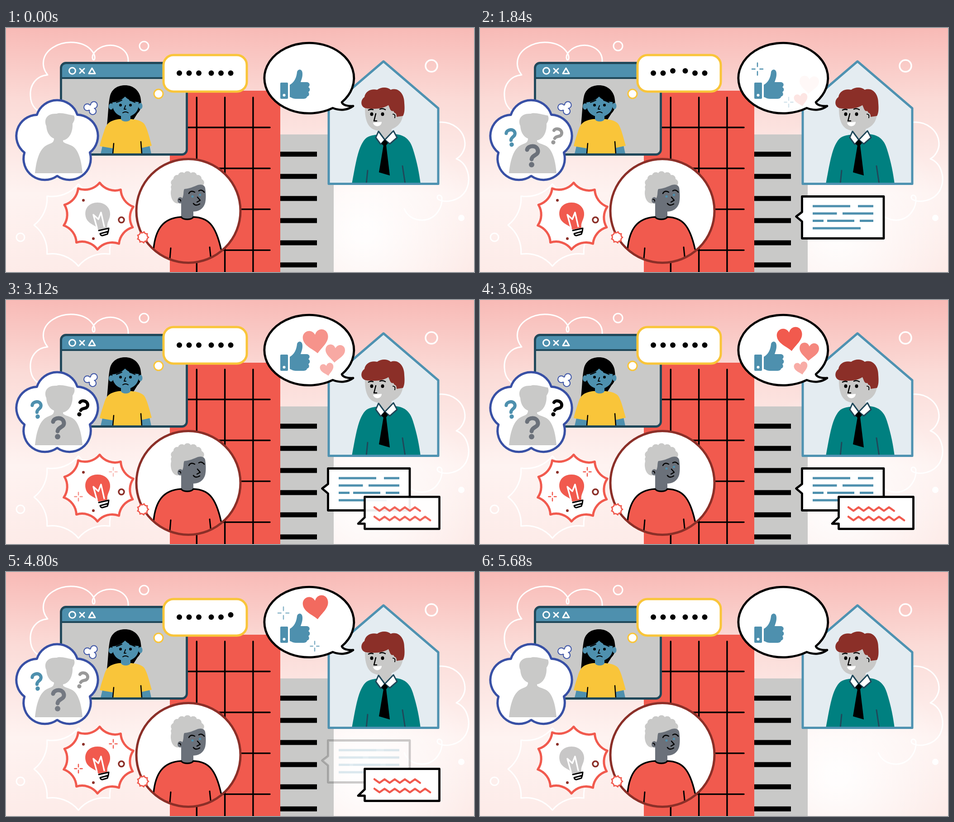
An HTML page with a canvas that plays this animation: 1034 by 541 pixels, repeating every 5.76 s.

```html
<!DOCTYPE html>
<html lang="en">
<head>
<meta charset="utf-8">
<title>Conversations</title>
<style>
html, body { margin: 0; width: 100%; height: 100%; overflow: hidden; }
canvas { display: block; width: 100vw; height: 100vh; }
</style>
</head>
<body>
<canvas id="stage" width="1034" height="541"></canvas>
<script>
const W = 1034, H = 541, LOOP = 5760, STEP = 80;
const RED = '#f15a4e', BLUE = '#4e90ae', GREY = '#c9c9c8', DARK = '#20485a',
  MAROON = '#8b2f28', YELLOW = '#f9c53a', INDIGO = '#3850a5', SLATE = '#6b717a',
  TEAL = '#008080', BLACK = '#000', WHITE = '#fff';

const stage = document.getElementById('stage').getContext('2d');
const backdrop = document.createElement('canvas');
backdrop.width = W;
backdrop.height = H;
let c = backdrop.getContext('2d');

function paint(shape, fill, line, width = 3) {
  const p = typeof shape === 'string' ? new Path2D(shape) : shape;
  if (fill) { c.fillStyle = fill; c.fill(p); }
  if (line) {
    c.strokeStyle = line;
    c.lineWidth = width;
    c.lineCap = c.lineJoin = 'round';
    c.stroke(p);
  }
}
function oval(x, y, rx, ry = rx) {
  const p = new Path2D();
  p.ellipse(x, y, rx, ry, 0, 0, 7);
  return p;
}
function box(x, y, w, h, r = 0) {
  const p = new Path2D();
  p.roundRect(x, y, w, h, r);
  return p;
}
function inside(shape, draw) {
  c.save();
  c.clip(shape);
  draw();
  c.restore();
}
function faded(alpha, draw) {
  if (alpha <= 0) return;
  c.save();
  c.globalAlpha = Math.min(1, alpha);
  draw();
  c.restore();
}
function repeat(n, draw) {
  for (let i = 0; i < n; i++) draw(i);
}

// n points on an ellipse, clockwise from the top
const ring = (n, x, y, rx, ry, turn = 0) => Array.from({ length: n }, (_, i) => {
  const a = turn + i / n * Math.PI * 2;
  return [x + rx * Math.sin(a), y - ry * Math.cos(a)];
});
// Closed outline of arcs between points: bulge 1 bows outwards, 0 inwards
const arcs = (points, r, bulge) =>
  `M${points[points.length - 1]}` + points.map(p => `A${r},${r} 0 0 ${bulge} ${p}`).join('') + 'Z';

function drawSky() {
  const g = c.createLinearGradient(0, 0, 0, H);
  g.addColorStop(0, '#f8bab6');
  g.addColorStop(.3, '#fbdbd7');
  g.addColorStop(.68, '#fef3f1');
  g.addColorStop(1, '#fdebe8');
  c.fillStyle = g;
  c.fillRect(0, 0, W, H);
  const glow = c.createRadialGradient(790, 450, 20, 790, 450, 250);
  glow.addColorStop(0, 'rgba(255,255,255,.9)');
  glow.addColorStop(1, 'rgba(255,255,255,0)');
  c.fillStyle = glow;
  c.fillRect(0, 0, W, H);
  paint('M270,76C272,48 245,35 222,39C200,43 187,60 192,70C197,73 199,62 190,51C172,28 130,26 104,43C80,58 76,84 92,104C68,106 52,125 54,151C55,174 68,186 90,193', null, WHITE);
  paint('M957,209C985,207 1012,225 1014,255C1015,270 1005,285 995,290C1020,300 1030,335 1015,362C1000,385 970,388 955,380C948,372 960,366 963,376C965,397 950,425 920,426C900,426 886,416 880,401', null, WHITE);
  paint(arcs(ring(8, 160, 437, 98, 91), 75, 0), null, WHITE);
  paint(oval(305, 40, 10), null, WHITE);
  paint(oval(940, 84, 13), null, WHITE, 3.5);
  paint(oval(32, 464, 9), null, WHITE);
  paint(oval(1006, 421, 7), WHITE);
}

function drawBuildings() {
  paint(box(605, 236, 119, 305), GREY);
  repeat(6, i => paint(box(605, 274.3 + i * 49.1, 82, 11), BLACK));
  paint(box(362, 139, 244, 402), RED);
  repeat(3, i => paint(`M${421.3 + i * 62.3},154V545`, null, BLACK, 3.4));
  repeat(4, i => paint(`M395,${220.5 + i * 90.7}H583`, null, BLACK, 3.4));
}

function drawWindow() {
  const frame = box(121.5, 77.5, 278, 203, 11);
  paint(frame, GREY);
  inside(frame, () => {
    paint(box(120, 76, 282, 35), BLUE);
    paint('M120,111H402', null, DARK, 4);
    drawWoman();
  });
  paint(frame, null, DARK, 4.8);
  paint(oval(146.5, 95, 7), null, WHITE);
  paint('M163,90L173,100M173,90L163,100', null, WHITE);
  paint('M190,89L197,101H183Z', null, WHITE);
}

function drawWoman() {
  paint('M223,216C226,190 226,166 230,150C235,133 249,127 263,127C280,127 293,137 297,153C300,170 300,180 290,190L280,206Z', BLACK);
  paint('M213,262L237,256V279H209ZM298,254L317,260L321,279H298Z', BLUE);
  paint('M250,202C230,205 222,211 217,228C212,243 209,253 207,262L237,267L236,279H300L299,266L322,261C316,240 312,222 305,212C298,205 288,203 277,202Z', YELLOW);
  paint('M238,256L236,279M298,252L300,279', null, BLACK, 2.5);
  paint(oval(232, 174, 5, 7), BLUE);
  paint(oval(297, 173, 4.5, 7), BLUE);
  paint('M254,188H275V202C273,209 256,209 254,202Z', BLUE);
  paint('M235,165C245,164 256,160 263,152C270,160 282,164 293,164C296,184 281,197 265,197C248,197 234,186 235,165Z', BLUE);
  paint('M244,165Q250,163 256,160M273,160Q279,162 285,165', null, BLACK, 2);
  paint('M264,172L261,180H265M258,188Q264,184 270,188', null, BLACK, 2);
}

function drawTyping() {
  paint(box(348, 60, 184, 81, 22), WHITE, YELLOW, 5);
  paint(oval(337, 146, 10), WHITE, YELLOW);
}

function drawThought() {
  paint(arcs(ring(5, 113, 253, 76, 75, -.63), 47, 1), WHITE, INDIGO, 5);
  paint('M64,322C67,292 74,270 88,261C98,255 106,256 106,245C96,241 90,231 89,217C83,203 90,189 112,190C120,186 137,192 150,194C154,202 149,209 147,212C148,232 139,247 126,249C125,256 137,256 147,262C160,270 167,294 169,322Z', GREY);
  const puffs = ring(3, 188.5, 177, 9, 8, -1.4);
  for (const p of puffs) paint(oval(...p, 6.5), null, INDIGO, 4);
  for (const p of puffs) paint(oval(...p, 6.5), WHITE);
  paint(oval(188.5, 177, 6), WHITE);
}

function drawIdea() {
  paint(arcs(ring(10, 204.5, 417, 80, 74, .03), 42, 0), WHITE, RED, 5);
  paint(oval(171, 382, 3), MAROON);
  paint(oval(193, 467, 3), MAROON);
  paint(oval(255, 425.5, 6), null, MAROON, 3.5);
}

function drawElder() {
  const disc = oval(403, 405.5, 115);
  paint(disc, WHITE);
  inside(disc, () => {
    paint('M326,492C330,450 345,421 388,419L414,419C448,420 464,438 477,492L477,530H326Z', RED);
    paint('M387,385H414V418C411,426 390,426 387,418Z', SLATE);
    paint('M326,490C330,448 346,421 387,419C391,426 410,426 414,419C446,420 463,436 475,490', null, BLACK, 3.5);
    paint('M364,488L361,524M450,486L453,515', null, BLACK, 3);
    for (const p of ring(14, 401, 348, 29, 22)) paint(oval(...p, 8.5), GREY);
    paint(oval(401, 348, 30, 24), GREY);
    paint(oval(379, 366, 15, 23), GREY);
    paint('M388,380C394,372 391,362 394,357C406,356 414,352 424,348C432,346 438,348 440,354C442,368 442,378 440,388C436,402 424,408 410,407C397,406 389,396 388,380Z', SLATE);
    paint(oval(385, 382, 6, 7), SLATE);
    paint('M382,380Q386,379 386,384', null, BLACK, 2);
    paint('M404,367Q408,359 417,364M426,361Q432,357 438,364', null, BLACK, 2.5);
    paint('M423,375L429,382L422,386M414,389Q419,396 428,390', null, BLACK, 2.5);
  });
  paint(disc, null, MAROON, 5);
  paint(arcs(ring(9, 302.5, 464, 12.5, 12.5, .2), 6, 0), WHITE, RED, 2.8);
}

function drawHouse() {
  const house = new Path2D('M713,345.5V178L834,74L955,178V345.5Z');
  paint(house, '#e4ecf1');
  inside(house, () => {
    paint('M764,346C773,300 778,258 797,243C806,237 820,237 828,235H850C878,234 892,245 899,268C908,296 913,322 916,346Z', TEAL);
    paint('M799,316L796,346M876,306L882,346', null, DARK);
    paint('M823,215H852V236L837,249L823,235Z', GREY);
    paint('M834,260H840L848,327L824,320Z', BLACK);
    paint('M823,229L817,243L828,258L837,248ZM856,228L864,243L848,257L837,248Z', WHITE, DARK);
    paint('M837,247L844,255L837,264L829,256Z', BLACK);
    paint('M793,172C792,210 802,228 828,228C858,228 876,214 877,190L850,165H800Z', GREY);
    paint('M796,178C783,176 782,160 792,153C794,139 808,134 820,137C830,130 843,131 850,137C866,131 880,145 880,166C881,178 881,188 877,195L863,197L856,184C849,186 848,177 845,171C832,180 810,180 796,178Z', MAROON);
    paint(oval(858, 195, 5, 7), GREY);
    paint('M855,191Q861,191 859,199', null, BLACK, 2);
    paint('M801,182Q806,179 811,181M826,180Q832,177 838,181', null, BLACK, 2.5);
    paint('M817,190L813,206H819', null, BLACK, 2.5);
    paint('M811,210L830,208C830,220 813,221 811,210Z', WHITE);
  });
  paint(house, null, '#4e92b1', 5);
}

function drawLikeBubble() {
  paint('M742,164.5A99,78 0 1 0 722,177.4C738,184 755,182 767,173C755,174 744,171 742,164.5Z', WHITE, BLACK, 4.8);
  paint(box(606, 121, 17, 36, 2), BLUE);
  paint(oval(614.5, 149, 3), WHITE);
  paint('M627,126C638,120 642,108 643,98C644,90 656,89 655,103C655,110 652,116 651,120H664C671,120 673,127 668,131C673,134 672,140 668,142C671,146 670,151 665,152C665,156 660,157 656,157H640C634,157 631,154 627,153Z', BLUE);
}

const clamp = v => Math.max(0, Math.min(1, v));
const smooth = v => v * v * (3 - 2 * v);
// Opacity that rises after one time and falls after another
const show = (t, from, to, rise = 400, fall = 400) =>
  clamp(Math.min((t - from) / rise, (to + fall - t) / fall));

function placed(alpha, x, y, size, turn, draw) {
  faded(alpha, () => {
    c.translate(x, y);
    c.rotate(turn);
    c.scale(size, size);
    draw();
  });
}
function question(t, order, x, y, size, turn, color) {
  placed(show(t, 480 + order * 600, 4960 - order * 200), x, y, size, turn, () => {
    paint('M-10,-33C-8,-43 12,-45 14,-31C15,-20 1,-22 0,-12', null, color, 9);
    paint(oval(0, 0, 6), color);
  });
}
// Smaller hearts come and go earlier, and climb less
function heart(t, order, x, y, turn) {
  const size = 56 - 13 * order;
  const climb = smooth(clamp((t - 1200) / 4320));
  const alpha = show(t, 2240 - order * 520, 4760 - order * 640, 1350 * (order + 1));
  placed(alpha, x, y - size * .47 * climb, size, turn, () =>
    paint('M0,.47C-.2,.25 -.5,.1 -.5,-.18C-.5,-.48 -.12,-.56 0,-.27C.12,-.56 .5,-.48 .5,-.18C.5,.1 .2,.25 0,.47Z', RED));
}
function sparkle(alpha, x, y, r, color) {
  placed(alpha, x, y, 1, 0, () => {
    const k = r * .45, v = r * 1.12;
    paint(`M${-r},0H${-k}M${k},0H${r}M0,${-v}V${-k}M0,${k}V${v}`, null, color, 2.5);
  });
}
function zigzag(x, y, count) {
  let d = `M${x},${y}`;
  repeat(count, i => d += `l11.2,${i % 2 ? -8 : 8}`);
  paint(d, null, RED, 4.5);
}

function drawBulb(t) {
  const bulb = 'M176,418C172,398 186,387 202,387C220,387 231,400 230,414C229,426 222,431 224,443L204,447C200,436 180,436 176,418Z';
  paint(bulb, '#c8c7c7');
  faded(show(t, 1440, 5040), () => paint(bulb, RED));
  paint('M201,443L193,414L204,424L210,409L217,440', null, WHITE, 3.4);
  paint('M205,449L227,444L226,451L208,456Q209,461 214,460L224,457L226,451', WHITE, BLACK, 3);
}

function drawEyes(t) {
  const open = from => t < from || t >= from + 160;
  if (open(4240)) for (const x of [253, 275]) paint(oval(x, 171, 3), BLACK);
  else paint('M249,171Q253,174 257,171M271,171Q275,174 279,171', null, BLACK, 2);

  if (open(3040)) for (const x of [412, 428.5]) paint(oval(x, 460 - x * .21, 2.6), BLUE);

  if (open(720)) for (const x of [808, 832]) paint(oval(x, 191, 3.5, 4), BLACK);
  else paint('M803,191Q808,194 812,191M827,191Q832,194 836,191', null, BLACK, 2.5);
}

function drawDots(t) {
  repeat(6, i => {
    const wave = mid => smooth(clamp(1 - Math.abs(t - mid - (i - 2.5) * 160) / 240));
    const x = 383 + i * 21.5 + (i > 2 ? 6 : 0);
    paint(oval(x, 100 - 6.7 * (wave(1840) + wave(4320)), 6), BLACK);
  });
}

function drawReactions(t) {
  sparkle(show(t, 800, 1840, 800, 600) + show(t, 4480, 5120, 480, 560), 613, 91, 12, BLUE);
  sparkle(show(t, 560, 1120, 400, 960) + show(t, 3800, 5200, 1400, 480), 682, 164.5, 9.5, BLUE);
  heart(t, 0, 685, 103, -.14);
  heart(t, 1, 727, 127, .07);
  heart(t, 2, 709.5, 160, -.2);
}

function drawMessages(t) {
  faded(show(t, 1440, 4480), () => {
    paint('M711.5,408V373.5H892V466.5H711.5V429L698.5,418Z', WHITE, BLACK, 4.8);
    repeat(4, i => {
      const y = 392.5 + i * 16.3;
      paint(box(735, y, i < 3 ? 134 : 106, 5), BLUE);
      if (i < 3) paint(box(818 - i * 29.5, y - 1, 17 - i * 4.5, 7), WHITE);
      if (i === 2) paint(box(827, y - 1, 12, 7), WHITE);
    });
  });
  faded(show(t, 2750, 5090), () => {
    paint('M792.5,482V436.5H957.5V507.5H792.5V496H778Z', WHITE, BLACK, 4.8);
    zigzag(814, 459.5, 9);
    zigzag(814, 480.5, 11);
  });
}

function draw(t) {
  c = stage;
  c.drawImage(backdrop, 0, 0);
  drawDots(t);
  drawEyes(t);
  question(t, 0, 70, 258.5, .8, -.16, BLUE);
  question(t, 1, 114, 303, 1, 0, SLATE);
  question(t, 2, 162, 253.5, .77, .35, BLACK);
  drawBulb(t);
  sparkle(show(t, 2720, 5120, 600, 560), 160, 436, 8.5, RED);
  sparkle(show(t, 2880, 4760, 600, 720), 237, 381, 8.5, RED);
  drawReactions(t);
  drawMessages(t);
}

drawSky();
drawBuildings();
drawWindow();
drawTyping();
drawThought();
drawIdea();
drawElder();
drawHouse();
drawLikeBubble();

const start = performance.now();
function tick() {
  const t = (performance.now() - start) % LOOP;
  draw(Math.floor(t / STEP) * STEP);
  requestAnimationFrame(tick);
}
tick();
</script>
</body>
</html>
```
